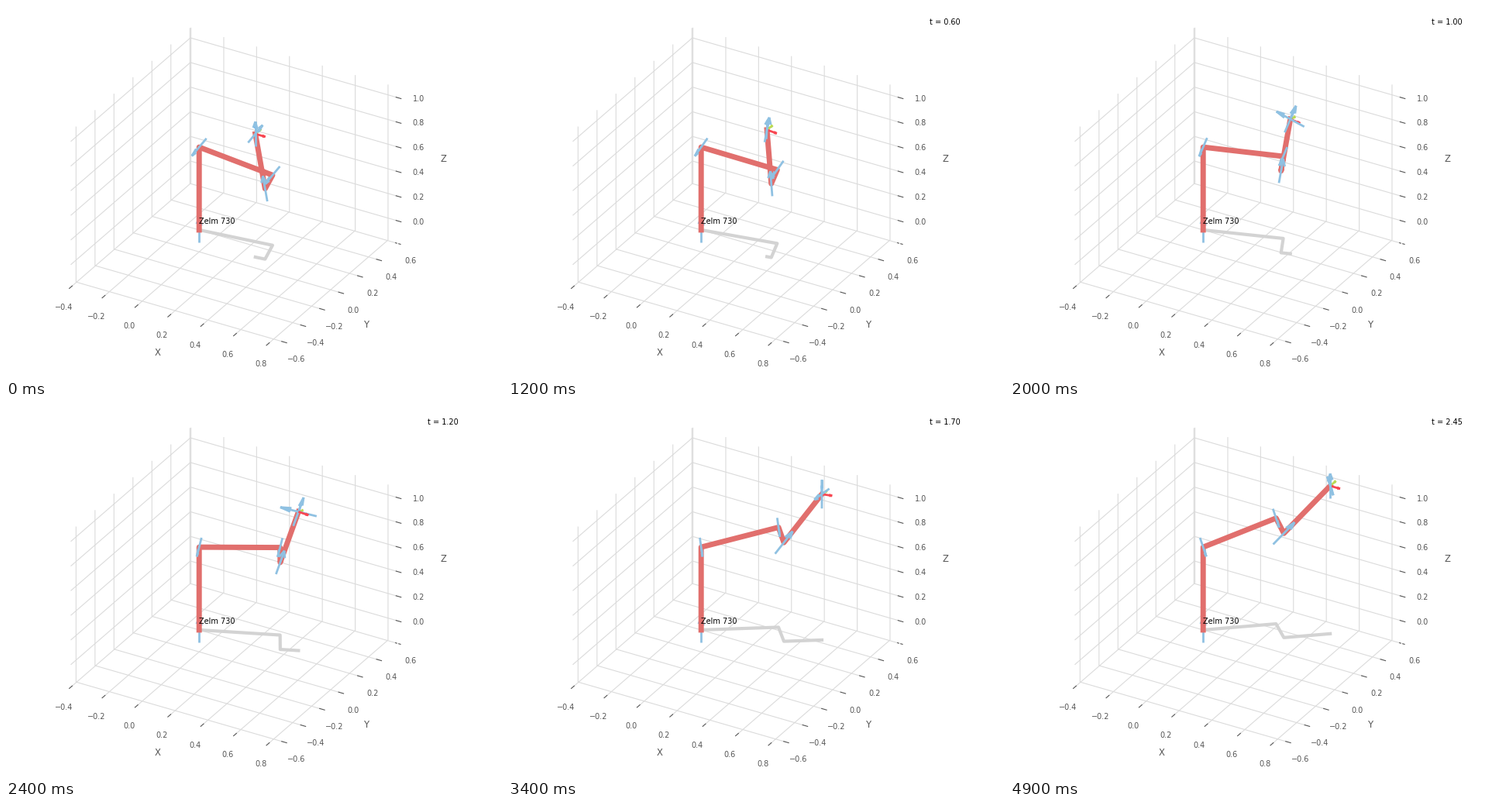
A matplotlib script for the animation above (5000 ms loop, 640x480 px).

```python
import numpy as np
import matplotlib.pyplot as plt
from matplotlib.animation import FuncAnimation

STEPS, INTERVAL, DT = 50, 100, 0.05
ROBOT_NAME = "Zelm 730"

# Standard DH parameters of the six-axis arm
D = [0.67183, 0, 0.15005, 0.4318, 0, 0]
A = [0, 0.4318, 0.0203, 0, 0, 0]
ALPHA = np.radians([90, 0, -90, 90, -90, 0])

LINK, SHADOW, JOINT = "#E16F6D", "lightgrey", "#8FC1E2"
EE_COLORS = ["#F84752", "#BADA55", "#54AEFF"]
JOINT_HALF, EE_LENGTH = 0.1, 0.06

plt.rcParams.update({
    "font.family": "DejaVu Sans",
    "font.size": 7,
    "axes.labelsize": "large",
    "axes.labelcolor": "#555555",
    "axes.edgecolor": "white",
    "axes.linewidth": 1,
    "xtick.color": "#555555",
    "ytick.color": "#555555",
    "grid.color": "#dbdbdb",
    "grid.linestyle": "-",
    "grid.linewidth": 0.8,
})


def dh(theta, d, a, alpha):
    ct, st, ca, sa = np.cos(theta), np.sin(theta), np.cos(alpha), np.sin(alpha)
    return np.array([[ct, -st * ca, st * sa, a * ct],
                     [st, ct * ca, -ct * sa, a * st],
                     [0, sa, ca, d],
                     [0, 0, 0, 1]])


def forward(q):
    """Poses of the base and of all six link frames."""
    poses = [np.eye(4)]
    for angle, d, a, alpha in zip(q, D, A, ALPHA):
        poses.append(poses[-1] @ dh(angle, d, a, alpha))
    return poses


def inverse(x, y, z, flip):
    """Elbow-down joint angles for an upright tool at (x, y, z)."""
    radius = np.hypot(x, y)
    q1 = np.arctan2(y, x) + np.arcsin(D[2] / radius)
    r, h = np.sqrt(radius**2 - D[2]**2), z - D[0]
    reach, upper, fore = np.hypot(r, h), A[1], np.hypot(A[2], D[3])
    bend = np.arccos((upper**2 + reach**2 - fore**2) / (2 * upper * reach))
    q2 = np.arctan2(h, r) - bend
    fore_angle = np.arctan2(h - upper * np.sin(q2), r - upper * np.cos(q2))
    pitch = fore_angle - np.arctan2(D[3], A[2])
    wrist = [-np.pi, pitch, np.pi - q1] if flip else [0, -pitch, -q1]
    return np.array([q1, q2, pitch - q2, *wrist])


Q_START = inverse(0.4, -0.1, 1.0, flip=True)
Q_END = inverse(0.6, 0.3, 1.2, flip=False)


def joint_angles(step):
    t = step / (STEPS - 1)
    s = t**3 * (10 - 15 * t + 6 * t**2)
    return Q_START + s * (Q_END - Q_START)


fig = plt.figure(figsize=(6.4, 4.8), dpi=100, facecolor="white")
ax = fig.add_subplot(projection="3d", proj_type="ortho")
fig.subplots_adjust(left=-0.09, bottom=0, top=1, right=0.99)
ax.set_facecolor("white")
ax.set_axisbelow(True)
ax.view_init(elev=30, azim=-60)
ax.set(xlim=(-0.403, 0.859), ylim=(-0.656, 0.606), zlim=(-0.178, 1.084),
       xlabel="X", ylabel="Y", zlabel="Z")
for axis in (ax.xaxis, ax.yaxis, ax.zaxis):
    axis.set_pane_color((1, 1, 1, 1))

ax.text(0, 0, 0.05, ROBOT_NAME)
shadow, = ax.plot([], [], [], color=SHADOW, linewidth=3)
links, = ax.plot([], [], [], color=LINK, linewidth=5)
timer = fig.text(0.85, 0.95, "")
arrows = []


def add_arrow(start, vector, color):
    arrows.append(ax.quiver(*start, *vector, color=color, linewidth=2))


def draw(step):
    while arrows:
        arrows.pop().remove()
    poses = forward(joint_angles(step))
    x, y, z = np.array([pose[:3, 3] for pose in poses[:5]]).T
    links.set_data_3d(x, y, z)
    shadow.set_data_3d(x, y, np.zeros_like(z))

    tool = poses[-1]
    for i, color in enumerate(EE_COLORS):
        add_arrow(tool[:3, 3], EE_LENGTH * tool[:3, i], color)
    for pose in poses[:-1]:
        half = JOINT_HALF * pose[:3, 2]
        add_arrow(pose[:3, 3] - half, 2 * half, JOINT)

    timer.set_text(f"t = {step * DT:.2f}" if step else "")


anim = FuncAnimation(fig, draw, frames=STEPS, interval=INTERVAL,
                     repeat=True, repeat_delay=0)
plt.show()
```
